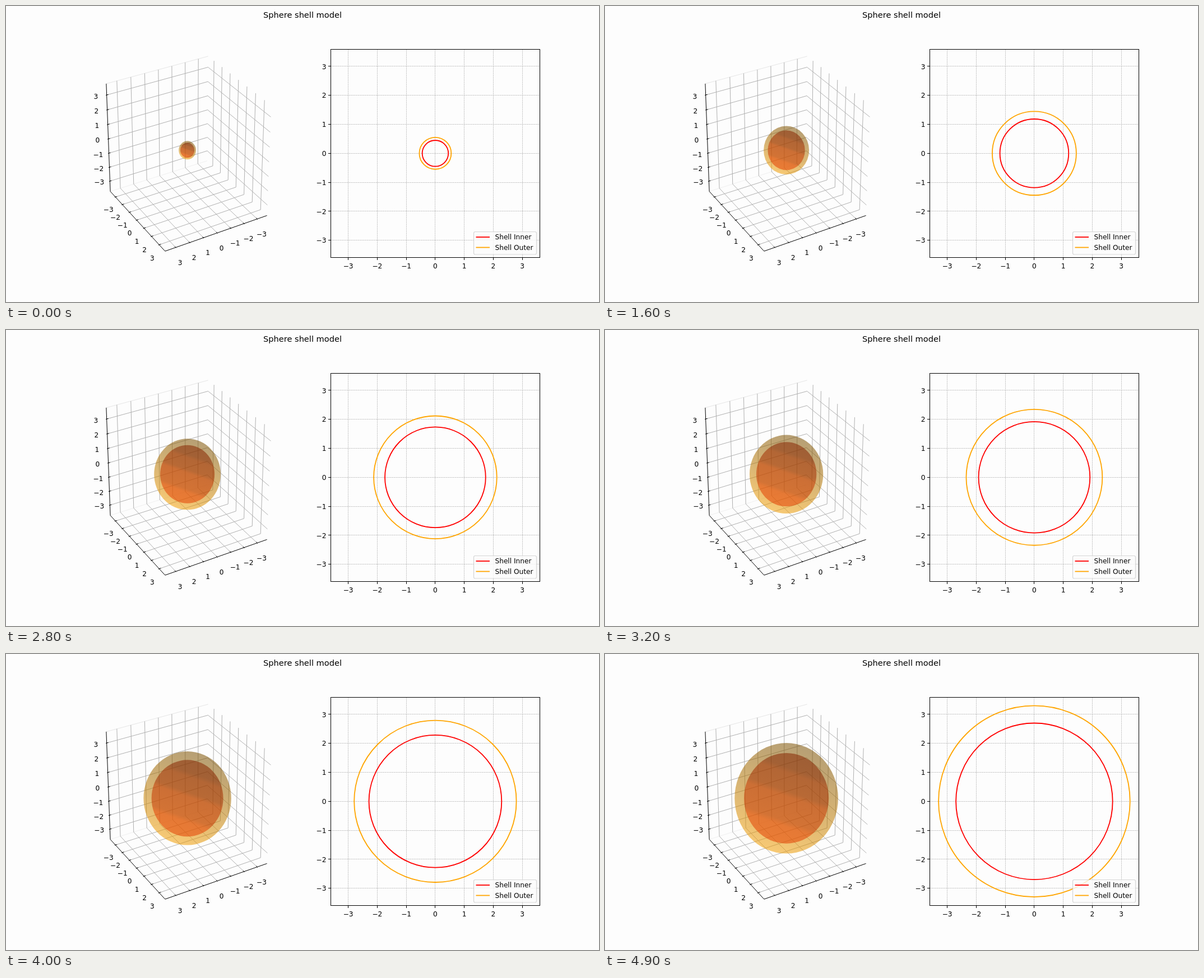
Write an HTML page with a canvas that moves like this. It is 1058 px wide and 529 px high and loops after 5 s.

```html
<!DOCTYPE html>
<html lang="en">
<head>
<meta charset="utf-8">
<title>Sphere shell model</title>
<style>
html, body { margin: 0; width: 100%; height: 100%; overflow: hidden; background: #fdfdfd; }
canvas { display: block; }
</style>
</head>
<body>
<canvas id="stage" width="1058" height="529"></canvas>
<script>
const ctx = document.getElementById('stage').getContext('2d');
const FONT = '"DejaVu Sans", Verdana, sans-serif';
const TICKS = [-3, -2, -1, 0, 1, 2, 3];
const LIMIT = 3.6, PANE = 3.75;
const STEP = 100, STEPS = 50;

// 3D view: perspective from distance 10 with the data range scaled to 1
const AZIM = Math.PI / 3, ELEV = Math.PI / 6, DIST = 10;
const VIEW = { x: 323.6, y: 257.8, sx: 2014.6, sy: 2156 };
// 2D plot
const PLOT = { x: 765.9, y: 263.3, unit: 51.77, left: 579.5, right: 952.5, top: 77.5, bottom: 449.5 };

const label = n => String(n).replace('-', '\u2212');
const snap = v => Math.floor(v) + 0.5;

function project(x, y, z) {
  const [a, b, c] = [x, y, z].map(v => v / (2 * LIMIT));
  const near = a * Math.cos(AZIM) + b * Math.sin(AZIM);
  const right = b * Math.cos(AZIM) - a * Math.sin(AZIM);
  const up = c * Math.cos(ELEV) - near * Math.sin(ELEV);
  const depth = DIST - near * Math.cos(ELEV) - c * Math.sin(ELEV);
  return [VIEW.x + VIEW.sx * right / depth, VIEW.y - VIEW.sy * up / depth];
}

function line(color, width, ...points) {
  ctx.strokeStyle = color;
  ctx.lineWidth = width;
  ctx.beginPath();
  points.forEach(p => ctx.lineTo(...p));
  ctx.stroke();
}

const line3 = (color, width, ...points) => line(color, width, ...points.map(p => project(...p)));

function text(str, x, y, align = 'center', size = 12.15) {
  ctx.font = `${size}px ${FONT}`;
  ctx.textAlign = align;
  ctx.fillStyle = '#000';
  ctx.fillText(str, x, y);
}

function tick3(t, from, to, at, dx, dy) {
  line3('#000', 1, from, to);
  const [x, y] = project(...at);
  text(label(t), x + dx, y + dy + 4.5);
}

function drawBox() {
  const P = PANE, grid = '#b0b0b0', inner = P - 0.12, outer = P + 0.06;
  line3('#e6e6e6', 1, [P, -P, P], [-P, -P, P]);
  line3('#f0f0f0', 1, [P, -P, -P], [-P, -P, -P]);
  for (const t of TICKS) {
    line3(grid, 1, [t, -P, P], [t, -P, -P], [t, P, -P]);
    line3(grid, 1, [-P, t, P], [-P, t, -P], [P, t, -P]);
    line3(grid, 1, [P, -P, t], [-P, -P, t], [-P, P, t]);
  }
  line3('#000', 1, [P, -P, P], [P, -P, -P], [P, P, -P], [-P, P, -P]);
  for (const t of TICKS) {
    tick3(t, [t, inner, -P], [t, outer, -P], [t, P, -P], 7.8, 26.6);
    tick3(t, [inner, t, -P], [outer, t, -P], [P, t, -P], -12.5, 22.9 + t * 0.35);
    tick3(t, [inner, -P, t], [outer, -P, t], [P, -P, t], -19.2, 2);
  }
}

// Front and back faces together give 0.54 coverage; shade runs down and slightly left
function sphere(radius, [r, g, b], bands) {
  const scale = radius / (2 * LIMIT * DIST);
  const shade = k => {
    const f = 0.48 + 0.47 * k;
    return `rgba(${r * f}, ${g * f}, ${b * f}, 0.54)`;
  };
  ctx.save();
  ctx.translate(VIEW.x, VIEW.y);
  ctx.scale(VIEW.sx * scale, VIEW.sy * scale);
  const fill = ctx.createLinearGradient(0.31, -0.95, -0.31, 0.95);
  bands.forEach((edge, i) => {
    const next = bands[i + 1] ?? 1;
    if (bands.length === 1) {
      fill.addColorStop(0, shade(0));
      fill.addColorStop(1, shade(1));
    } else {
      const color = shade((edge + next) / 2);
      fill.addColorStop(edge && edge + 0.03, color);
      fill.addColorStop(next === 1 ? 1 : next - 0.03, color);
    }
  });
  ctx.fillStyle = fill;
  ctx.beginPath();
  ctx.arc(0, 0, 1, 0, 2 * Math.PI);
  ctx.fill();
  ctx.restore();
}

function drawPlotGrid() {
  const { left, right, top, bottom, unit } = PLOT;
  for (const t of TICKS) {
    const x = snap(PLOT.x + t * unit), y = snap(PLOT.y - t * unit);
    ctx.setLineDash([2.24, 0.97]);
    line('#b0b0b0', 0.75, [x, bottom], [x, top]);
    line('#b0b0b0', 0.75, [left, y], [right, y]);
    ctx.setLineDash([]);
    line('#000', 1, [x, bottom], [x, bottom + 4.5]);
    line('#000', 1, [left, y], [left - 4.5, y]);
    text(label(t), PLOT.x + t * unit, 468.5);
    text(label(t), 571.5, PLOT.y - t * unit + 4.7, 'right');
  }
}

function circle(radius, color) {
  ctx.strokeStyle = color;
  ctx.lineWidth = 1.82;
  ctx.beginPath();
  ctx.arc(PLOT.x, PLOT.y, radius * PLOT.unit, 0, 2 * Math.PI);
  ctx.stroke();
}

function drawLegend() {
  ctx.beginPath();
  ctx.roundRect(834.5, 403.5, 112, 40.5, 2.5);
  ctx.fillStyle = 'rgba(253, 253, 253, 0.8)';
  ctx.fill();
  ctx.strokeStyle = 'rgba(204, 204, 204, 0.8)';
  ctx.lineWidth = 1.2;
  ctx.stroke();
  line('#f00', 1.82, [838.5, 413], [863, 413]);
  line('#ffa500', 1.82, [838.5, 431.5], [863, 431.5]);
  text('Shell Inner', 872.5, 417.3, 'left');
  text('Shell Outer', 872.5, 435.8, 'left');
}

function draw() {
  const step = Math.floor(performance.now() / STEP) % STEPS;
  const mid = 0.5 + 2.5 * step / (STEPS - 1);
  const inner = 0.9 * mid, outer = 1.1 * mid;

  ctx.fillStyle = '#fdfdfd';
  ctx.fillRect(0, 0, 1058, 529);
  text('Sphere shell model', 529, 21, 'center', 14.58);

  drawBox();
  sphere(outer, [255, 165, 0], [0]);
  sphere(inner, [255, 69, 0], [0, 0.2, 0.45, 0.77]);

  drawPlotGrid();
  circle(inner, '#f00');
  circle(outer, '#ffa500');
  ctx.strokeStyle = '#000';
  ctx.lineWidth = 1;
  ctx.strokeRect(PLOT.left, PLOT.top, PLOT.right - PLOT.left, PLOT.bottom - PLOT.top);
  drawLegend();

  requestAnimationFrame(draw);
}
draw();
</script>
</body>
</html>
```
